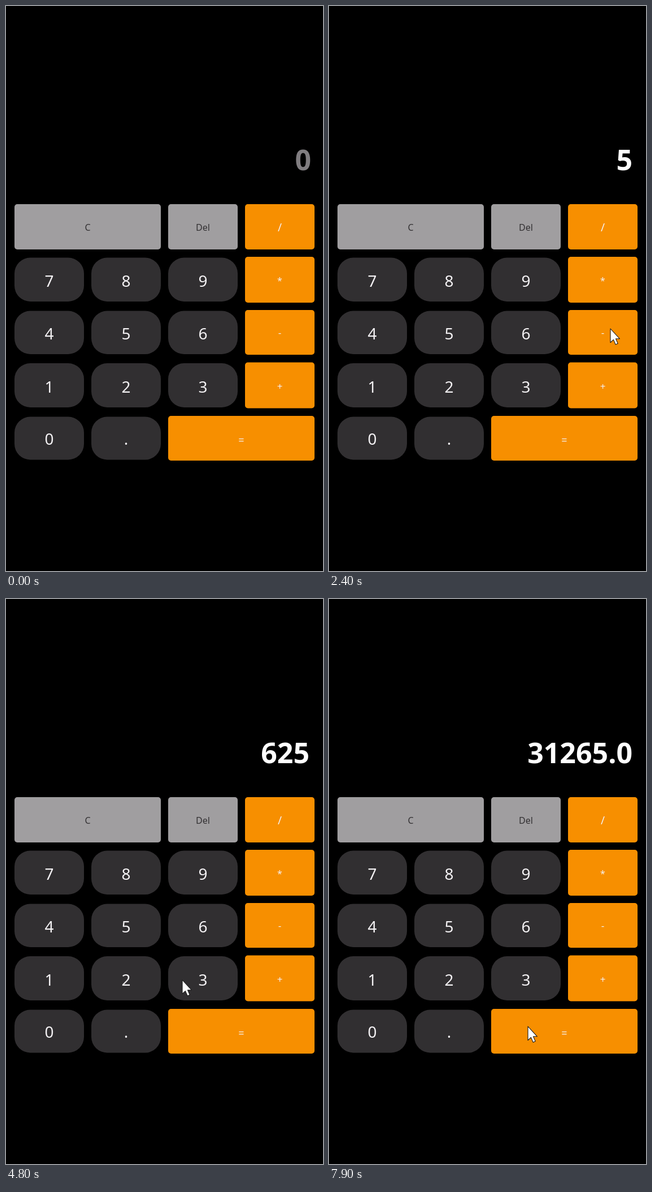
Write an HTML page that moves like this. It is 561 px wide and 998 px high and loops after 8000 ms.

```html
<!DOCTYPE html>
<html lang="en">
<head>
<meta charset="utf-8">
<title>Calculator</title>
<style>
  html, body { margin: 0; width: 100%; height: 100%; overflow: hidden; background: #000; }
  svg { display: block; width: 561px; height: 998px; font-family: "Noto Sans", "Open Sans", sans-serif; }
  .label { text-anchor: middle; fill: #f4f2f4; }
  #display { text-anchor: end; font-size: 50px; font-weight: 700; }
</style>
</head>
<body>
<svg viewBox="0 0 561 998">
  <g id="keys"></g>
  <text id="display" y="290"></text>
  <path id="cursor" d="M0 0V24.5L5.4 19.4L9.2 28L13.2 26.2L9.5 17.8H16.5Z"
        fill="#fff" stroke="#1c1c1c" stroke-width="1.1" stroke-linejoin="round"/>
</svg>
<script>
const LOOP = 8000, STEP = 100;
const GREY = '#a09ea0', ORANGE = '#f78f00', DARK = '#312f31';
const columns = [15, 151, 287, 423];
const $ = id => document.getElementById(id);
const keys = $('keys'), display = $('display'), cursor = $('cursor');

function add(tag, attrs, text = '') {
  const el = document.createElementNS('http://www.w3.org/2000/svg', tag);
  for (const name in attrs) el.setAttribute(name, attrs[name]);
  el.textContent = text;
  keys.append(el);
}

function addKey(label, column, span, top, bottom, baseline, fill, size) {
  const x = columns[column], width = 123 + (span - 1) * 136;
  add('rect', { x, y: top, width, height: bottom - top, rx: fill === DARK ? 28 : 5, fill });
  const text = { class: 'label', x: x + width / 2, y: baseline, 'font-size': size };
  if (fill === GREY) text.style = 'fill:#333133';
  add('text', text, label);
}

addKey('C', 0, 2, 350, 430, 397, GREY, 16);
addKey('Del', 2, 1, 350, 430, 397, GREY, 16);
addKey('/', 3, 1, 350, 430, 398, ORANGE, 19);
addKey('*', 3, 1, 443, 524, 491, ORANGE, 16);
addKey('-', 3, 1, 537, 616, 583, ORANGE, 17);
addKey('+', 3, 1, 629.5, 710.5, 678, ORANGE, 17);
addKey('=', 2, 2, 724, 803, 773, ORANGE, 18);
[['789', 444.5, 522, 496], ['456', 538.5, 615, 589], ['123', 631, 709, 683], ['0.', 725.5, 801.5, 775]]
  .forEach(([row, top, bottom, baseline]) =>
    [...row].forEach((key, i) => addKey(key, i, 1, top, bottom, baseline, DARK, 28)));

// Pointer stops: time, x, y and, where a key is pressed, the new display
const stops = [
  [100, 400, 774], [300, 365, 590, '6'], [700, 440, 484, '6*'], [800, 386, 478],
  [900, 372, 482, '6*9'], [1400, 425, 778, '54'], [1600, 430, 790], [1800, 425, 745],
  [2100, 350, 392, '5'], [2400, 498, 570], [2500, 490, 572, '5-'], [2700, 368, 580, '5-6'],
  [2900, 366, 580, '5-66'], [3200, 474, 750, '-61'], [3300, 472, 748], [3700, 472, 748],
  [3900, 170, 392, ''], [4200, 350, 585, '6'], [4400, 220, 680, '62'], [4600, 222, 585, '625'],
  [4800, 312, 673], [4900, 330, 676, '6253'], [5100, 480, 395, '6253/'], [5400, 90, 768, '6253/0'],
  [5900, 212, 768, '6253/0.'], [6300, 230, 768], [6700, 306, 757], [6900, 225, 680, '6253/0.2'],
  [7200, 352, 757, '31265.0'], [7900, 352, 755]
];
const ease = p => p * p * (3 - 2 * p);

function draw(t) {
  let value = '', i = -1;
  while (i + 1 < stops.length && stops[i + 1][0] <= t) value = stops[++i][3] ?? value;

  display.textContent = value || '0';
  display.setAttribute('x', value ? 537 : 540);
  display.setAttribute('fill', value ? '#fff' : '#807d80');

  cursor.style.display = i < 0 ? 'none' : '';
  if (i < 0) return;
  const from = stops[i], to = stops[i + 1] || from;
  const p = to === from ? 0 : ease((t - from[0]) / (to[0] - from[0]));
  const at = k => from[k] + (to[k] - from[k]) * p;
  cursor.setAttribute('transform', `translate(${at(1)} ${at(2)})`);
}

const start = performance.now();
function frame() {
  const t = (performance.now() - start) % LOOP;
  draw(Math.floor(t / STEP) * STEP);
  requestAnimationFrame(frame);
}
frame();
</script>
</body>
</html>
```
